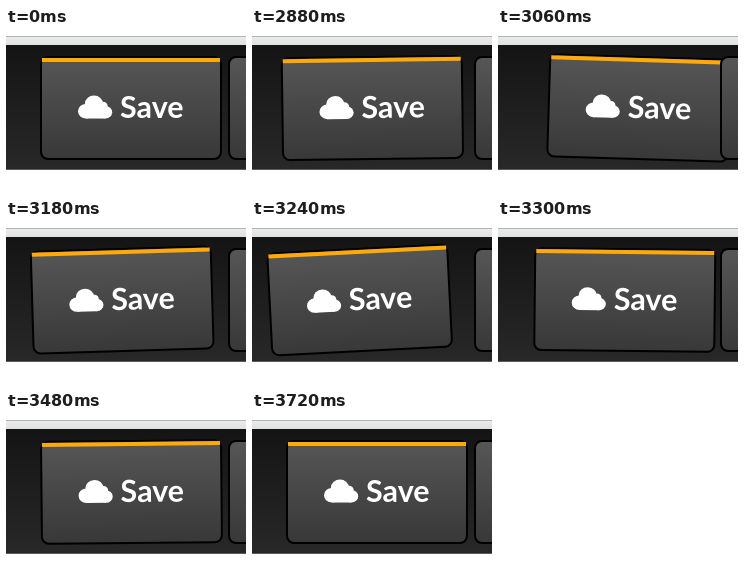
Write an HTML page that moves like this. It is 240 by 164 pixels and loops after 4800 ms.

```html
<!DOCTYPE html>
<html lang="en">
<head>
<meta charset="utf-8">
<title>Wobbling save button</title>
<style>
html, body { margin: 0; width: 100%; height: 100%; overflow: hidden; background: #fff; }
svg { display: block; width: 100vw; height: 100vh; }
text { font: 700 30.5px Lato, "Open Sans", sans-serif; fill: #fff; }
</style>
</head>
<body>
<svg viewBox="0 0 240 164">
  <defs>
    <linearGradient id="chrome" x2="0" y2="1">
      <stop stop-color="#e9ebea"/><stop offset="1" stop-color="#dfe2e0"/>
    </linearGradient>
    <linearGradient id="bar" x2="0" y2="1">
      <stop stop-color="#131413"/><stop offset="1" stop-color="#282828"/>
    </linearGradient>
    <linearGradient id="face" x2="0" y2="1">
      <stop stop-color="#565656"/><stop offset="1" stop-color="#383838"/>
    </linearGradient>
  </defs>

  <rect width="240" height="164" fill="#fff"/>
  <rect y="8" width="240" height="1" fill="#b4b4b4"/>
  <rect y="9" width="240" height="8" fill="url(#chrome)"/>
  <rect y="17" width="240" height="124" fill="url(#bar)"/>
  <rect y="141" width="240" height="1" fill="#5a5a5a"/>

  <g id="save">
    <rect x="35" y="29" width="180" height="102" rx="7" fill="url(#face)" stroke="#000" stroke-width="2"/>
    <rect x="36" y="30" width="178" height="4" fill="#ffa90a"/>
    <g fill="#fff" transform="translate(72 65.5) scale(.0178 .0163)">
      <circle cx="896" cy="640" r="512"/>
      <circle cx="1408" cy="768" r="256"/>
      <circle cx="448" cy="1088" r="448"/>
      <circle cx="1536" cy="1152" r="384"/>
      <rect x="448" y="800" width="1088" height="736"/>
    </g>
    <text x="114" y="90">Save</text>
  </g>

  <rect x="223" y="29" width="180" height="102" rx="7" fill="url(#face)" stroke="#000" stroke-width="2"/>
</svg>

<script>
const LOOP = 4800, STEP = 60, START = 2863, DURATION = 848;
// [progress, shift in px, rotation in degrees]
const KEYS = [
  [0, 0, 0], [.15, -30, -5], [.3, 24, 3], [.45, -17.3, -2.9],
  [.6, 8.8, 1.9], [.75, .4, -.6], [1, 0, 0]
];
const save = document.getElementById('save');

const bezier = (a, b, s) => 3 * a * s * (1 - s) ** 2 + 3 * b * s * s * (1 - s) + s ** 3;

// The CSS "ease" curve
function ease(x) {
  let low = 0, high = 1;
  for (let i = 0; i < 20; i++) {
    const mid = (low + high) / 2;
    if (bezier(.25, .25, mid) < x) low = mid; else high = mid;
  }
  return bezier(.1, 1, low);
}

function pose(p) {
  if (p <= 0 || p >= 1) return [0, 0];
  const i = KEYS.findIndex(key => key[0] > p);
  const [p0, x0, r0] = KEYS[i - 1], [p1, x1, r1] = KEYS[i];
  const k = ease((p - p0) / (p1 - p0));
  return [x0 + (x1 - x0) * k, r0 + (r1 - r0) * k];
}

const origin = performance.now();
function draw() {
  const time = (performance.now() - origin) % LOOP;
  const stepped = Math.floor(time / STEP) * STEP;
  const [x, angle] = pose((stepped - START) / DURATION);
  save.setAttribute('transform', `translate(${x} 0) rotate(${angle} 125 80)`);
  requestAnimationFrame(draw);
}
draw();
</script>
</body>
</html>
```
